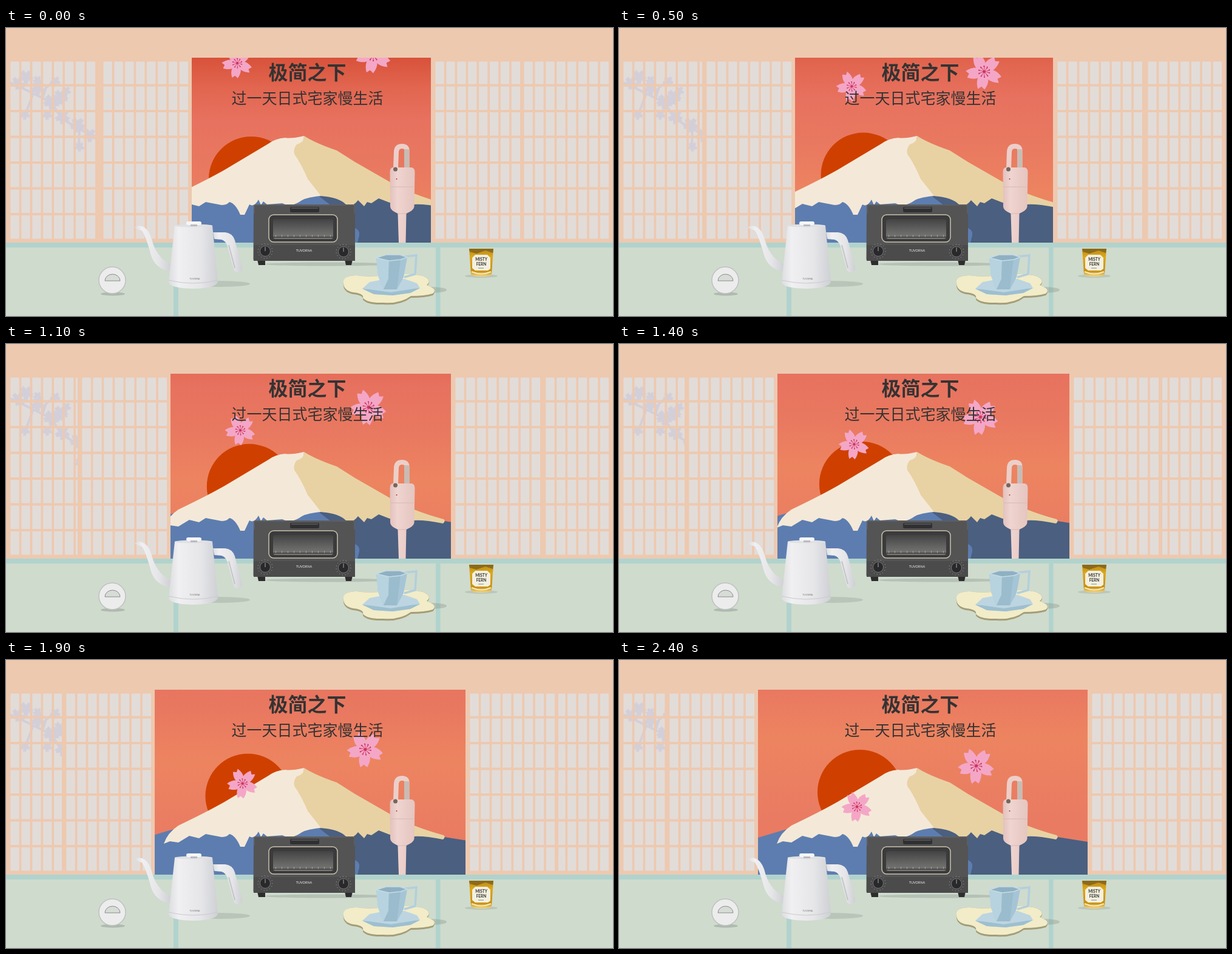
These frames come from a looping animation (1000x475 px, 4.4 s). An HTML page:

```html
<!DOCTYPE html>
<html lang="zh-CN">
<head>
<meta charset="utf-8">
<style>
html, body { margin: 0; width: 100%; height: 100%; overflow: hidden; background: #edc9b0 }
svg { display: block; width: 1000px; height: 475px }
text { text-anchor: middle; fill: #333; font-family: "Noto Sans CJK SC", "Noto Sans CJK", sans-serif }
.tiny { font-family: Lato, sans-serif }
</style>
</head>
<body>
<svg viewBox="0 0 1000 475">
<defs>
  <linearGradient id="skyFill" x2="0" y2="1">
    <stop stop-color="#d8523a"/><stop offset=".1" stop-color="#e26650"/><stop offset=".21" stop-color="#e7725f"/>
    <stop offset=".37" stop-color="#e97960"/><stop offset=".52" stop-color="#ed8460"/><stop offset=".78" stop-color="#e97b62"/>
  </linearGradient>
  <linearGradient id="white">
    <stop stop-color="#dcdde0"/><stop offset=".2" stop-color="#f0f0f2"/><stop offset=".65" stop-color="#e6e6e9"/><stop offset="1" stop-color="#cfd0d4"/>
  </linearGradient>
  <linearGradient id="pink"><stop stop-color="#e3c1bd"/><stop offset=".3" stop-color="#efd4cf"/><stop offset="1" stop-color="#e5c5c0"/></linearGradient>
  <linearGradient id="amber" x2="0" y2="1">
    <stop stop-color="#b98a18"/><stop offset=".3" stop-color="#dda81c"/><stop offset=".8" stop-color="#c98f10"/><stop offset="1" stop-color="#f0d88a"/>
  </linearGradient>
  <linearGradient id="glass" x2="0" y2="1"><stop stop-color="#434344"/><stop offset=".6" stop-color="#656564"/><stop offset="1" stop-color="#7b7a77"/></linearGradient>
  <clipPath id="window"><path d="M150 49H850V354H150z"/></clipPath>
  <path id="petal" d="M0 0C5 -9 15 -13 29 -6L25 0L30 5C16 12 5 8 0 0z"/>
  <g id="blossom">
    <g id="petals"></g>
    <circle r="5.5" fill="none" stroke="#cf3a66" stroke-width="8" stroke-dasharray=".9 2.556"/>
    <circle r="9" fill="none" stroke="#cf3a66" stroke-width="2" stroke-dasharray="1.8 3.855"/>
    <circle r="2.6" fill="#c93560"/>
  </g>
  <path id="lattice" fill="#edc9b0" fill-rule="evenodd"/>
  <g id="panel"><path d="M0 49H153V354H0z" fill="#e2dcd9"/><use href="#lattice"/></g>
</defs>

<path d="M0 0H1000V475H0z" fill="#edc9b0"/>

<g clip-path="url(#window)">
  <rect id="sky" x="150" y="49" width="700" height="500" fill="url(#skyFill)"/>
  <circle id="sun" r="70" fill="#cf4000"/>
  <path d="M150 319L229 293L290 275H500L620 290L722 292L850 312V354H150z" fill="#5d7db0"/>
  <path d="M515 277L545 300L575 330Q583 333 582 342L579 354H850V312L772 300L722 292L640 282z" fill="#4b5f80"/>
  <path d="M260 303Q266 285 284 273Q330 251 360 234L432 191Q444 182 460 181Q470 183 491 178L487 222L519 277Q492 279 483 287Q468 296 455 289L430 291L424 286L420 292L416 283Q409 296 401 291L393 308L386 308Q378 289 368 287Q362 294 350 291L329 287L318 294L302 290L284 301L270 299z" fill="#f4e9d8"/>
  <path d="M491 178Q510 190 545 202L575 221L636 256Q670 275 721 289Q725 292 720 296Q690 290 672 291L655 283L632 288L614 281L602 289L595 287L590 294L580 284Q570 297 560 291Q548 279 519 277L497 249Q487 225 475 208Q473 199 479 192Q492 188 491 178z" fill="#e8d2a3"/>
  <use id="leftBlossom" href="#blossom"/>
  <use id="rightBlossom" href="#blossom"/>
</g>

<text x="496.5" y="84.5" font-size="32" font-weight="700">极简之下</text>
<text x="496.5" y="125" font-size="25">过一天日式宅家慢生活</text>

<g>
  <path d="M0 49H153V354H0z" fill="#e2dcd9"/>
  <g id="branch" fill="#d3cfd9" stroke="#d3cfd9">
    <path d="M7 90Q25 98 45 108T75 123L92 150L121 166L147 182M75 123L100 112M60 116L66 98L80 88M45 108L32 142M121 166L120 195M28 98L36 80" fill="none" stroke-width="4"/>
  </g>
  <use href="#lattice"/>
</g>
<use href="#panel" x="846"/>
<use id="leftDoor" href="#panel"/>
<use id="rightDoor" href="#panel"/>

<path d="M0 354H1000V475H0z" fill="#cfdbcd"/>
<path d="M0 354H1000V362H715.5V475H708V362H284V475H276V362H0z" fill="#b1d3cd"/>

<g id="vacuum" transform="translate(.5 0)">
  <path d="M641.5 232L642.5 204Q643 195 652 195T660 204L660 231" fill="none" stroke="#eccfc9" stroke-width="8"/>
  <path d="M659.5 200L660 231" stroke="#c6bdb6" stroke-width="8"/>
  <path d="M636 230H668Q673 231 673 238L672 295Q671 301 659 306L658 354H646.5L645 306Q633 301 632.5 295L632 238Q632 231 636 230z" fill="url(#pink)"/>
  <path d="M645 306H659M633 262H672" stroke="#d9b8b3" fill="none"/>
  <circle cx="641" cy="233" r="3.5" fill="#74675f"/>
  <circle cx="643" cy="249" r="1" fill="#a33"/>
</g>

<g id="oven">
  <ellipse cx="530" cy="389.5" rx="104" ry="3" fill="#8d9a90" opacity=".4"/>
  <path d="M414 382H427V391H416zM558 382H571L569 391H560z" fill="#2d2d2e"/>
  <path d="M411 291H572Q575 291 575 295V381Q575 384 572 384H411Q407 384 407.5 380L408 295Q408 291 411 291z" fill="#545455"/>
  <path d="M409 306V292H574V306" fill="none" stroke="#68686a"/>
  <path d="M408 358H575V384H408z" fill="#4b4b4c"/>
  <rect x="468" y="295" width="48" height="9" rx="2" fill="#303032"/>
  <path d="M470 297H514" stroke="#777"/>
  <rect x="433" y="308" width="113" height="45" rx="8" fill="#3b3b3c" stroke="#c9c1ad" stroke-width="1.5"/>
  <rect x="440" y="315" width="99" height="33" rx="4" fill="url(#glass)"/>
  <path d="M440 345H539" stroke="#3a3a3a" stroke-width="1.5"/>
  <path d="M444 343H537" stroke="#aaa" stroke-width="3" stroke-dasharray="1 9"/>
  <g fill="#29292b" stroke="#77777a">
    <circle cx="427" cy="368" r="8.5"/><circle cx="556" cy="369" r="8.5"/>
    <path d="M427 361V368M556 362V369" stroke="#aaa"/>
  </g>
  <g fill="none" stroke="#b5b5b5" stroke-dasharray="1 4">
    <circle cx="427" cy="368" r="12"/><circle cx="556" cy="369" r="12"/>
  </g>
  <text class="tiny" x="491" y="369" font-size="5.5" style="fill:#eee">TUVORNA</text>
</g>

<g id="kettle">
  <ellipse cx="352" cy="422" rx="50" ry="5" fill="#8d9a90" opacity=".35"/>
  <path d="M212 329Q217 325 224 327Q235 331 240 348Q247 378 272 390L270 401Q246 397 239 375Q231 345 224 334Q217 332 212 329z" fill="url(#white)"/>
  <path d="M341 337H361Q373 338 377 350L389 395Q390 401 383 403Q376 403 375 397L365 360Q362 351 355 349L343 348z" fill="url(#white)"/>
  <path d="M367 358L377 396" stroke="#c4c5c9" stroke-width="2"/>
  <path d="M278 326Q309 322 340 326L349 417Q350 429 309 430Q267 429 268 418z" fill="url(#white)"/>
  <path d="M268 416Q309 426 349 416" fill="none" stroke="#c9cacd"/>
  <ellipse cx="309" cy="326" rx="31" ry="2.5" fill="#dfe0e3"/>
  <rect x="297" y="319" width="25" height="6" rx="3" fill="#f6f6f7"/>
  <path d="M304 324H315V327H304z" fill="#b9babd"/>
  <text class="tiny" x="311" y="415" font-size="3.5" style="fill:#777">TUVORNA</text>
</g>

<g id="opener">
  <ellipse cx="176" cy="438.5" rx="20" ry="3" fill="#8d9a90" opacity=".5"/>
  <circle cx="175" cy="416" r="22" fill="#ececed" stroke="#c0c1c2" stroke-width="1.5"/>
  <path d="M163 417A12.5 11 0 0 1 188 417z" fill="#d7dcd6" stroke="#8b8c8c"/>
</g>

<g id="tray">
  <ellipse cx="701" cy="432" rx="25" ry="5" fill="#8d9a90" opacity=".4"/>
  <path id="puddle" d="M556 423Q553 408 578 408Q600 411 622 408Q660 403 687 409Q703 416 693 424Q712 431 703 439Q690 443 667 443Q650 456 622 454Q595 455 588 446Q590 439 572 437Q557 434 556 423z" fill="#a39d78" transform="translate(0 2)"/>
  <use href="#puddle" y="-2" style="filter:none"/>
  <path d="M556 422Q553 408 578 408Q600 411 622 408Q660 403 687 409Q703 416 693 424Q712 431 703 438Q690 442 667 442Q650 455 622 453Q595 454 588 445Q590 438 572 436Q557 433 556 422z" fill="#f2ecc8"/>
  <path d="M587 430L599 419L625 414H657L677 421L682 429L666 437L637 441L606 439z" fill="#bcd5e1"/>
  <path d="M598 431L634 436L672 430L682 429L666 437L637 441L606 439L587 430z" fill="#9dbfd0"/>
  <path d="M657 377L676 375L674 406L656 411" fill="none" stroke="#b2cfdc" stroke-width="3.5"/>
  <path d="M610 379L626 374L649 374L661 378L655 411L644 431L622 431L613 409z" fill="#a5c5d6"/>
  <path d="M610 379L631 384L630 414L622 431L613 409z" fill="#b7d3e0"/>
  <path d="M631 384L650 382L646 413L644 431H622L630 414z" fill="#9abccd"/>
  <path d="M610 379L626 374L649 374L661 378L650 382L631 384z" fill="#8fb0c2" stroke="#c6dce5" stroke-width="1.5"/>
</g>

<g id="candle">
  <ellipse cx="783" cy="409" rx="27" ry="3" fill="#8d9a90" opacity=".3"/>
  <path d="M763 364H803L800 406Q798 410 783 410T766 406z" fill="url(#amber)"/>
  <path d="M763 364H803L802 371L790 367L775 372L764 369z" fill="#8c6a1a"/>
  <path d="M767 402Q783 409 799 402" fill="none" stroke="#f8eab5" stroke-width="2"/>
  <path d="M773 374H793L798 379V397L794 400H773L768 396V379z" fill="#f4f0df"/>
  <text class="tiny" x="783" y="384" font-size="6.5" font-weight="700">MISTY</text>
  <text class="tiny" x="783" y="391.5" font-size="6.5" font-weight="700">FERN</text>
  <path d="M778 396H787" stroke="#888"/>
</g>
</svg>
<script>
const $ = id => document.getElementById(id);
const place = (id, x, y, extra = '') => $(id).setAttribute('transform', `translate(${x} ${y}) ${extra}`);

let lattice = 'M0 49H153V354H0z';
for (let col = 0; col < 8; col++)
  for (let row = 0; row < 7; row++) {
    const x = 7.5 + 17.9 * col, y = row ? 54 + 42.5 * row : 55.5, h = row ? 38.5 : 37;
    lattice += `M${x} ${y}h14.2v${h}h-14.2z`;
  }
$('lattice').setAttribute('d', lattice);

const fivePetals = (x, y, size) => [0, 72, 144, 216, 288].map(a =>
  `<use href="#petal" transform="translate(${x} ${y}) scale(${size}) rotate(${a + 20})"/>`).join('');
$('petals').innerHTML = `<g fill="#f4a6c6">${fivePetals(0, 0, 1)}</g>`;

const twigs = [[19, 91, .38], [33, 81, .42], [52, 100, .42], [31, 143, .3], [52, 86, .26], [75, 122, .46],
  [90, 114, .44], [81, 88, .3], [93, 147, .42], [99, 104, .28], [118, 160, .44], [121, 196, .28], [138, 177, .4], [68, 143, .3]];
$('branch').innerHTML += twigs.map(t => fivePetals(...t)).join('');

function draw() {
  const step = Math.min(24, Math.floor(performance.now() % 4400 / 100));
  const p = step / 24, at = (a, b) => a + (b - a) * p;
  place('leftDoor', Math.round(at(153, 76)), 0);
  place('rightDoor', at(700, 772), 0);
  place('sky', 0, at(0, -180));
  place('sun', at(404, 397), at(249, 218));
  place('leftBlossom', at(381, 392), at(58, 242), `scale(.84) rotate(${at(8, 6)})`);
  place('rightBlossom', at(605, 588.5), at(45, 174.5), `rotate(${at(10, 2)})`);
  requestAnimationFrame(draw);
}
draw();
</script>
</body>
</html>
```
